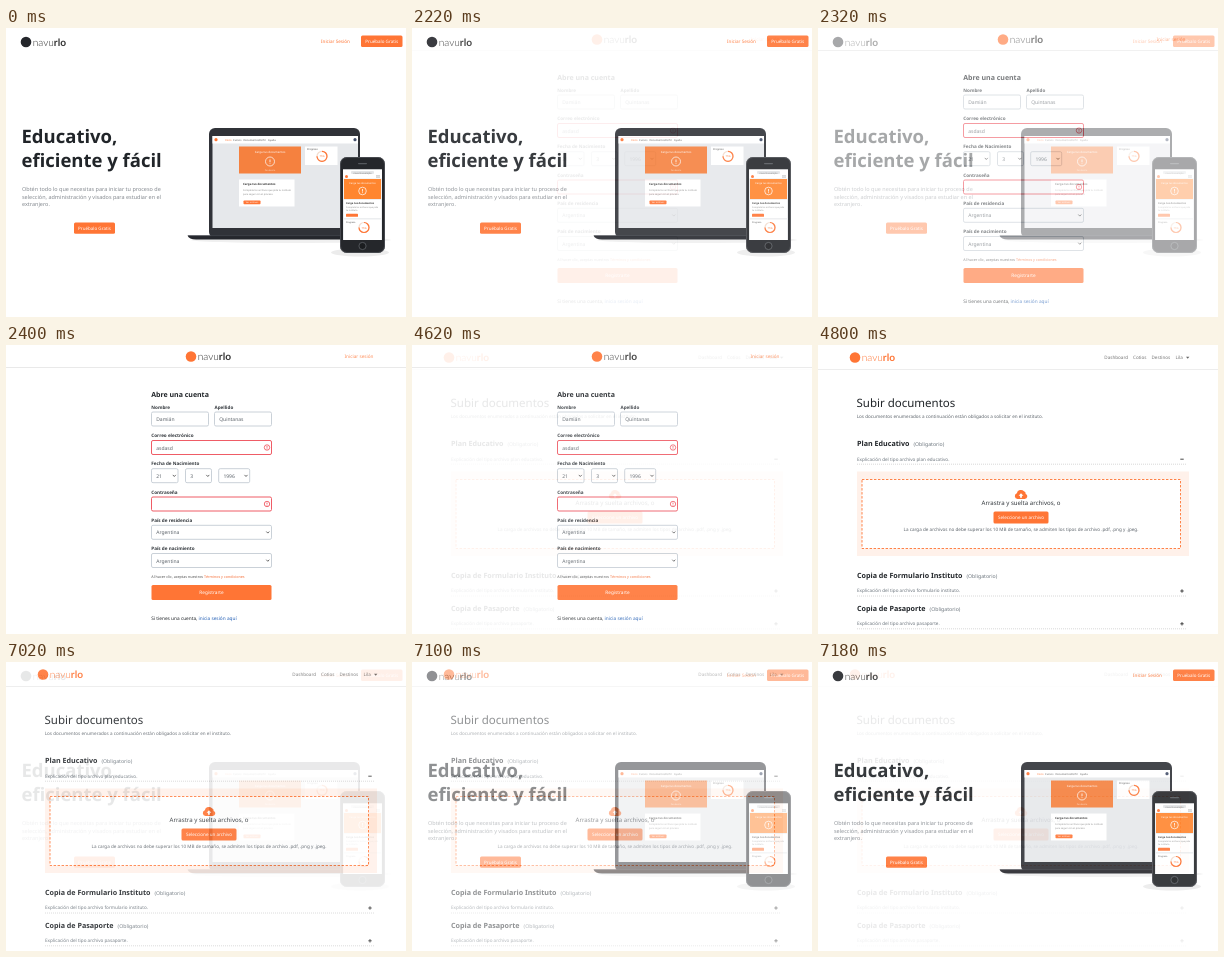
An HTML page for the animation above (7.2 s loop, 400 by 289 pixels).

```html
<!DOCTYPE html>
<html lang="es">
<head>
<meta charset="utf-8">
<title>Navurlo</title>
<style>
html, body { margin: 0; width: 100%; height: 100%; overflow: hidden; background: #fff; }
svg { display: block; }
text { font-family: "Noto Sans", "Open Sans", sans-serif; text-rendering: geometricPrecision; white-space: pre; }
.brand { font-family: Lato, sans-serif; font-size: 10.2px; font-weight: 300; }
</style>
</head>
<body>
<svg id="stage" width="400" height="289" viewBox="0 0 400 289"></svg>
<script>
const ORANGE = '#ff7535', INK = '#212529', GREY = '#6c757d', RED = '#ee4a55';

// Drawing helpers, each returning SVG markup
const text = (x, y, size, str, fill = INK, weight = 400, anchor = 'start') =>
  `<text x="${x}" y="${y}" font-size="${size}" fill="${fill}" font-weight="${weight}" text-anchor="${anchor}">${str}</text>`;
const rect = (x, y, w, h, fill, r = 0, extra = '') =>
  `<rect x="${x}" y="${y}" width="${w}" height="${h}" rx="${r}" fill="${fill}" ${extra}/>`;
const circle = (x, y, r, fill, extra = '') =>
  `<circle cx="${x}" cy="${y}" r="${r}" fill="${fill}" ${extra}/>`;
const path = (d, stroke, width = 1, fill = 'none', extra = '') =>
  `<path d="${d}" stroke="${stroke}" stroke-width="${width}" fill="${fill}" ${extra}/>`;
const button = (x, y, w, h, label, size = 4.5, weight = 500) =>
  rect(x, y, w, h, ORANGE, 1.5) + text(x + w / 2, y + h / 2 + size * 0.36, size, label, '#fff', weight, 'middle');
const brand = (x, y, mark, ink) =>
  circle(x, y, 5.3, mark) +
  `<text class="brand" x="${x + 6.7}" y="${y + 3.5}" fill="${ink}">navu<tspan font-weight="700">rlo</tspan></text>`;
const ring = (x, y, r) =>
  circle(x, y, r, 'none', 'stroke="#f3ddcf" stroke-width="1.2"') +
  path(`M${x} ${y - r}A${r} ${r} 0 1 1 ${x - r} ${y}`, ORANGE, 1.2) +
  text(x, y + 1, 2.6, '75%', ORANGE, 400, 'middle');
const badge = (x, y, r) =>
  circle(x, y, r, 'none', 'stroke="#fff" stroke-width=".7"') + path(`M${x} ${y - 2}v2.6m0 .7v.8`, '#fff', 0.8);

function laptop() {
  return `<ellipse cx="285" cy="212" rx="100" ry="3" fill="#f0f0f0"/>` +
    rect(203, 100, 151, 110, '#303238', 6) +
    rect(206.5, 108, 145.5, 92, '#e6e8eb') +
    rect(206.5, 108, 145.5, 7.5, '#fff') +
    circle(210, 111.7, 1.6, ORANGE) + circle(349, 111.7, 1.6, '#44506b') +
    text(219, 112.7, 2.6, 'Inicio', ORANGE) +
    text(227, 112.7, 2.6, 'Cursos   Documentos', '#555') +
    text(253, 112.7, 2.6, 'Perfil    Ayuda', '#555') +
    rect(233, 118.5, 62, 27, '#f5813f') +
    text(264, 125, 2.9, 'Carga tus documentos', '#fff', 500, 'middle') +
    badge(264, 133.5, 4.5) +
    text(264, 142.5, 2.2, 'Pendiente', '#ffd9c2', 400, 'middle') +
    rect(233, 151.5, 55.5, 27, '#fff') +
    text(237, 157.3, 2.9, 'Carga tus documentos', '#333', 700) +
    text(237, 163, 2.4, 'Completa los archivos que pide tu instituto', '#888') +
    text(237, 166.5, 2.4, 'para seguir con el proceso.', '#888') +
    rect(237.5, 172.5, 17, 3.7, ORANGE, 0.8) +
    text(246, 175.2, 2.2, 'Ver archivos', '#fff', 400, 'middle') +
    rect(299, 118.5, 32.5, 18.5, '#fff') +
    text(301, 122.3, 2.5, 'Progreso', '#444') + ring(316, 128.3, 5) +
    path('M181.5 207.5H345V211.5H190Q183 211.5 181.5 207.5Z', 'none', 0, '#25272d') +
    path('M182 207.6H335', '#4a4d54', 0.6);
}

function phone() {
  return `<ellipse cx="354" cy="224.5" rx="29" ry="4" fill="#ececec"/>` +
    rect(334, 129, 45, 96, '#25272b', 7) +
    rect(334.5, 129.5, 44, 95, 'none', 6.5, 'stroke="#55585d" stroke-width=".7"') +
    rect(352, 135, 9, 1.2, '#55585d', 0.6) +
    rect(337, 141.5, 39, 70.5, '#eceef0') +
    rect(337, 141.5, 39, 9, '#fff') +
    rect(345, 143, 23, 3, '#e3e5e7', 1) +
    text(356.5, 145.5, 2.3, 'navurlo.example', '#777', 400, 'middle') +
    circle(340.5, 148.6, 1.5, ORANGE) + path('M370 147.8h4m-4 1.4h4', '#888', 0.5) +
    rect(338, 151, 37, 20, '#ff862f') +
    text(356.5, 156, 2.5, 'Carga tus documentos', '#fff', 500, 'middle') +
    badge(356.5, 163, 3.8) +
    rect(338, 172, 37, 18, '#fff') +
    text(340, 176.3, 2.5, 'Carga tus documentos', '#333', 700) +
    text(340, 180.3, 2.2, 'Completa los archivos que pide', '#888') +
    text(340, 183, 2.2, 'tu instituto.', '#888') +
    rect(340, 185.8, 12, 3, ORANGE, 0.6) +
    rect(338, 191.5, 37, 20.5, '#fff') +
    text(340, 194.6, 2.2, 'Progreso', '#444') + ring(358, 199.5, 5) +
    circle(356.5, 218, 3.6, '#1b1d20', 'stroke="#666a70" stroke-width=".7"');
}

function home() {
  const intro = ['Obtén todo lo que necesitas para iniciar tu proceso de',
    'selección, administración y visados para estudiar en el', 'extranjero.'];
  return brand(20, 14, '#24262b', '#333') +
    text(315, 15.2, 4.6, 'Iniciar Sesión', ORANGE) +
    button(355, 7.5, 41.5, 11.5, 'Pruébalo Gratis') +
    text(15.5, 115, 18.5, 'Educativo,', INK, 700) +
    text(15.5, 139, 18.5, 'eficiente y fácil', INK, 700) +
    intro.map((line, i) => text(16, 163 + i * 7.5, 5.48, line, '#858a90')).join('') +
    button(68, 194.5, 41, 11.3, 'Pruébalo Gratis') +
    laptop() + phone();
}

const label = (x, y, str) => text(x, y, 4.6, str, '#33383d', 600);
const field = (x, y, w, value, border = '#c5ccd4') =>
  rect(x, y, w, 14, '#fff', 1.5, `stroke="${border}" stroke-width=".9"`) + text(x + 4.7, y + 9, 5, value, '#5c636a');
const select = (x, y, w, value) =>
  field(x, y, w, value) + path(`M${x + w - 5.2} ${y + 6.2}l1.5 1.6l1.5-1.6`, '#444', 0.8);
const invalid = (y, value) =>
  field(145.5, y, 120, value, RED) +
  circle(261, y + 7, 2.7, 'none', `stroke="${RED}" stroke-width=".8"`) +
  path(`M261 ${y + 5.5}v1.8m0 .6v.8`, RED, 0.8);

function signup() {
  return brand(185, 11.5, ORANGE, '#333') +
    text(338.5, 13, 4.7, 'Iniciar sesión', '#ff8d59') +
    path('M0 22.5H400', '#e9e9e9') +
    text(145.2, 52, 7, 'Abre una cuenta', INK, 700) +
    label(145.3, 63.8, 'Nombre') + field(145.5, 67, 57, 'Damián') +
    label(208.5, 63.8, 'Apellido') + field(208.5, 67, 57, 'Quintanas') +
    label(145.3, 92, 'Correo electrónico') + invalid(95.5, 'asdasd') +
    label(145.3, 120.3, 'Fecha de Nacimiento') +
    select(145.5, 123.7, 26.5, '21') + select(179.5, 123.7, 26, '3') + select(212.7, 123.7, 31, '1996') +
    label(145.3, 148.7, 'Contraseña') + invalid(152, '') +
    label(145.3, 176.8, 'País de residencia') + select(145.5, 180.3, 120, 'Argentina') +
    label(145.3, 205.2, 'País de nacimiento') + select(145.5, 208.5, 120, 'Argentina') +
    text(145.3, 233.4, 3.7, `Al hacer clic, aceptas nuestros <tspan fill="#f5703a">Términos y condiciones</tspan>`, '#555') +
    button(145.5, 240, 120, 15, 'Registrarte', 4.7) +
    text(145.3, 275, 4.75, `Si tienes una cuenta, <tspan fill="#2460b5">inicia sesión aquí</tspan>`, INK);
}

function section(y, title, kind, sign) {
  return text(39, y, 7.15, `${title}<tspan dx="4" font-size="5.2" font-weight="400" fill="${GREY}">(Obligatorio)</tspan>`, INK, 600) +
    text(39, y + 14.3, 4.6, `Explicación del tipo archivo ${kind}.`, GREY) +
    path(`M362.3 ${y + 13}h3.4` + (sign === '+' ? 'm-1.7-1.7v3.4' : ''), '#333', 0.9) +
    path(`M39 ${y + 18}H368`, '#cfcfcf', 0.8, 'none', 'stroke-dasharray="1 1"');
}

function documents() {
  const nav = [[286.3, 'Dashboard'], [315, 'Cotios'], [333.5, 'Destinos'], [357.5, 'Lila']];
  return brand(37, 12.5, ORANGE, ORANGE) +
    nav.map(([x, str]) => text(x, 14, 4.6, str, '#777')).join('') +
    path('M368 11.8h3.4l-1.7 1.9z', 'none', 0, '#666') +
    path('M0 24.5H400', '#ededed') +
    text(38.5, 62, 11.5, 'Subir documentos', INK, 500) +
    text(38.7, 72.7, 4.6, 'Los documentos enumerados a continuación están obligados a solicitar en el instituto.', '#5f666d') +
    section(101.2, 'Plan Educativo', 'plan educativo', '-') +
    rect(39, 126.5, 332, 84.5, '#fff1ea') +
    rect(44, 134.5, 318.5, 69, '#fff', 0, `stroke="${ORANGE}" stroke-width=".9" stroke-dasharray="2.4 1.6"`) +
    path('M199.5 154A3 3 0 0 1 198.8 148.2A4.2 4.2 0 0 1 206 146.3A2.6 2.6 0 0 1 207.7 149A2.6 2.6 0 0 1 206.8 154Z', 'none', 0, ORANGE) +
    path('M203 148.2l-2.4 2.5h1.5v2h1.8v-2h1.5z', 'none', 0, '#fff') +
    text(203, 160.2, 6.1, 'Arrastra y suelta archivos, o', '#33383d', 400, 'middle') +
    button(175.5, 166.5, 55, 12, 'Seleccione un archivo', 4.55, 400) +
    text(203, 186.3, 4.6, 'La carga de archivos no debe superar los 10 MB de tamaño, se admiten los tipos de archivo .pdf, .png y .jpeg.', '#5f666d', 400, 'middle') +
    section(233, 'Copia de Formulario Instituto', 'formulario instituto', '+') +
    section(265.8, 'Copia de Pasaporte', 'pasaporte', '+');
}

const stage = document.getElementById('stage');
stage.innerHTML = [home, signup, documents, home]
  .map(draw => `<g>${rect(0, 0, 400, 289, '#fff')}${draw()}</g>`).join('');
const slides = [...stage.children];

const LOOP = 7200, HOLD = 2220, PERIOD = 2400, STEP = 20, STEPS = 10;
const start = performance.now();

// Each slide fades in over the one before it, in ten equal steps
function frame() {
  const time = (performance.now() - start) % LOOP;
  slides.forEach((slide, i) => {
    if (i === 0) return;
    const since = time - (i - 1) * PERIOD - HOLD;
    const alpha = Math.min(1, Math.max(0, (Math.floor(since / STEP) + 1) / STEPS));
    slide.setAttribute('opacity', alpha);
    slide.setAttribute('visibility', alpha ? 'visible' : 'hidden');
  });
  requestAnimationFrame(frame);
}
frame();
</script>
</body>
</html>
```
